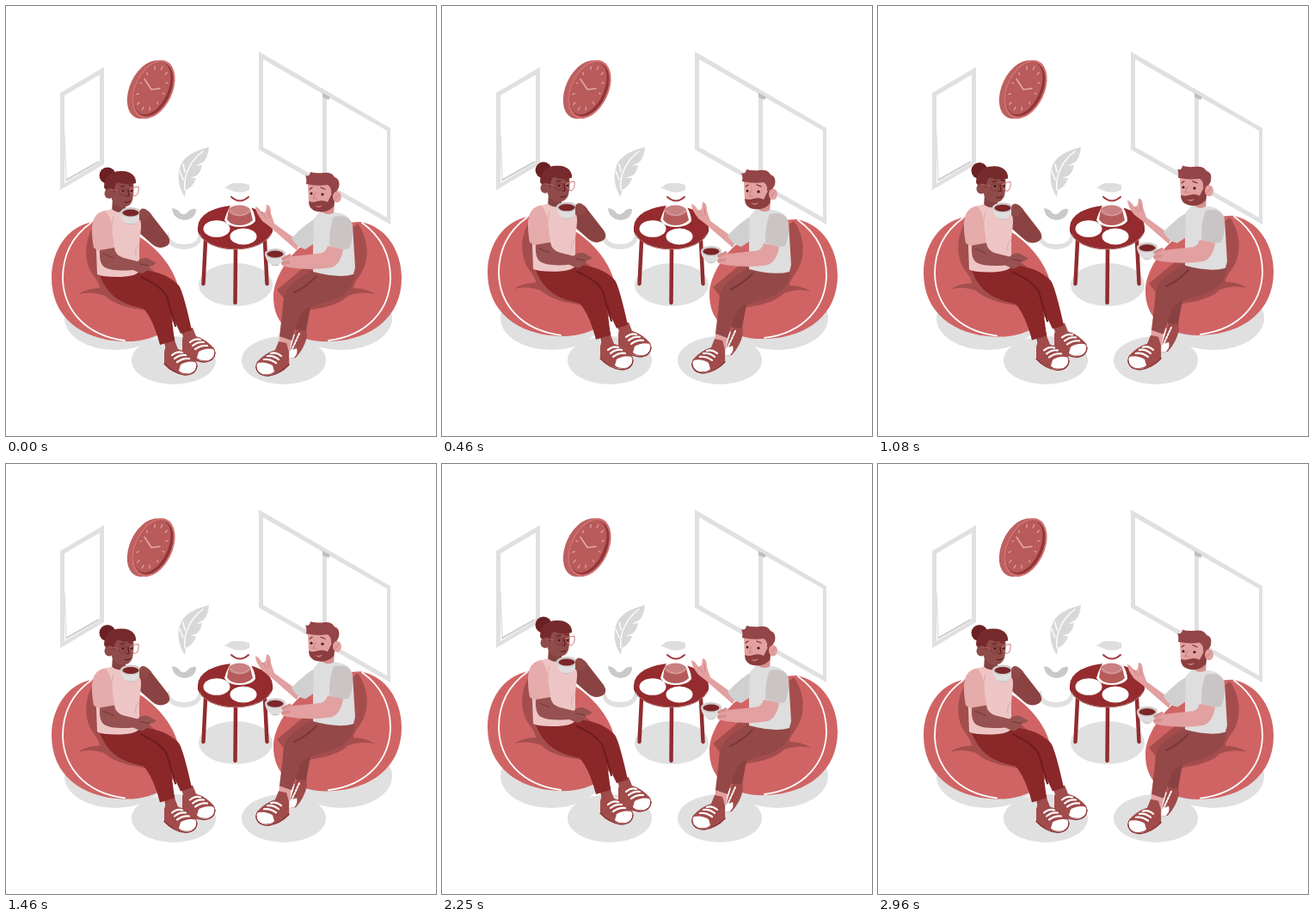
Animation, 500 px wide and 500 px high, one loop 3 s. Source, as an HTML page:

```html
<!DOCTYPE html>
<html lang="en">
<head>
<meta charset="utf-8">
<title>Coffee chat</title>
<style>
  html, body { margin: 0; height: 100%; overflow: hidden; background: #fff; }
  svg { display: block; width: 100%; height: 100%; }
  .line { fill: none; stroke-linecap: round; stroke-linejoin: round; }
</style>
</head>
<body>
<svg viewBox="0 0 500 500">
  <defs>
    <g id="bag">
      <path fill="#d06464" d="M101 251C71 256 53 285 53 316C53 362 88 388 135 390C176 392 203 372 202 337C200 300 155 252 101 251Z"/>
      <path fill="#a54d4d" d="M104 253C91 271 89 296 102 314Q109 323 109 328Q95 328 84 335Q100 331 115 337C132 352 152 351 177 357L198 330L150 290Z"/>
      <path class="line" stroke="#fff" stroke-width="1.8" d="M99 252C75 269 66 292 66 317C67 352 91 383 138 389"/>
    </g>
    <g id="shoe">
      <path fill="#a14b4b" d="M184 402L187 391L196 389L200 399Q211 402 221 413C225 421 220 428 209 428Q194 427 184 416Z"/>
      <path fill="#fff" d="M203 417Q211 412 220 414Q225 423 214 427Q205 428 201 424Z"/>
      <path class="line" stroke="#8b3033" stroke-width="1.3" d="M184 416Q194 427 208 429Q221 429 222 418"/>
      <path class="line" stroke="#fff" stroke-width="2.2" d="M193 406Q199 401 205 403M196 410Q202 405 209 406M199 414Q206 409 213 410"/>
    </g>
    <g id="cup">
      <path fill="#dedede" d="M-12 -1Q-10 8 -4 11Q0 13 4 11Q10 8 12 -1Z"/>
      <ellipse rx="12" ry="6" cy="-2" fill="#cfcaca"/>
      <ellipse rx="9.5" ry="4" cy="-1.5" fill="#7b2629"/>
      <path class="line" stroke="#c2bcbc" d="M-4 11Q0 13 4 11"/>
    </g>
  </defs>

  <!-- windows -->
  <g fill="#e0e0e0" fill-rule="evenodd">
    <path d="M63 101L114 71V184L63 214ZM68 104V206L109 182V80Z"/>
    <path d="M294 53L447 142V254L294 167ZM299 62V164L368 203V102ZM373 105V206L443 246V145Z"/>
  </g>
  <path d="M68 150L70 203L109 181" class="line" stroke="#e0e0e0" stroke-width="1.5"/>
  <path d="M70 202L107 181" class="line" stroke="#bababa"/>
  <path d="M368 101L377 106L375 109L368 106Z" fill="#bdbdbd"/>

  <!-- clock -->
  <g transform="translate(171.5 97) rotate(25)">
    <ellipse cx="-5" cy="2.5" rx="22" ry="36" fill="#bd6060"/>
    <ellipse rx="22" ry="36" fill="#cf7070"/>
    <ellipse rx="20" ry="33.5" fill="#913638"/>
    <ellipse cx="-1.8" cy="-.5" rx="18.2" ry="32.5" fill="#b95b5b"/>
    <g id="ticks" stroke="#e3a3a3" stroke-width="1.2"></g>
  </g>
  <path class="line" stroke="#e6aaaa" stroke-width="1.5" d="M161 85L169 97L179 96"/>

  <!-- plant -->
  <path fill="#d8d8d8" d="M208 222C199 209 198 191 206 180C213 171 225 167 236 164Q235 175 230 181L221 186L228 185Q227 192 222 197L214 200L221 200Q218 210 209 214Z"/>
  <path class="line" stroke="#fff" stroke-width="1.4" d="M208 214C206 196 215 179 229 169M206 202L202 192M208 193L206 184"/>
  <ellipse cx="207" cy="270" rx="20" ry="13" fill="#e0e0e0"/>
  <path fill="#fff" d="M190 236H224V266Q222 277 207 277Q192 277 190 266Z"/>
  <path fill="#c9c9c9" d="M193 235Q200 236 203 241Q207 244 211 240Q215 235 221 236Q221 248 207 249Q194 247 193 235Z"/>

  <!-- floor shadows -->
  <g fill="#e0e0e0">
    <ellipse cx="127" cy="363" rx="59" ry="37"/>
    <ellipse cx="390" cy="363" rx="59" ry="37"/>
    <ellipse cx="195" cy="412" rx="49" ry="28"/>
    <ellipse cx="323" cy="412" rx="49" ry="28"/>
    <ellipse cx="267" cy="324" rx="43" ry="25"/>
  </g>

  <!-- table and jug -->
  <path class="line" stroke="#912c2f" stroke-width="4.5" d="M232 273L229.500 323M301 273L303.500 323M267 284L266.500 345"/>
  <path fill="#7d2326" d="M223 257V262A44 25 0 0 0 310 262V257Z"/>
  <ellipse cx="266.500" cy="257" rx="43.500" ry="25" fill="#952b2e"/>
  <path class="line" stroke="#c98a8a" stroke-width=".8" d="M225 265A43 24 0 0 0 308 265"/>
  <g fill="#fff">
    <ellipse cx="245" cy="259" rx="15.500" ry="9.800"/>
    <ellipse cx="276" cy="268" rx="15.500" ry="9.500"/>
    <path d="M260 215H283L281 228Q290 240 290 250Q285 257 272 257Q258 257 254 249Q257 238 263 229Z"/>
  </g>
  <path fill="#b55b5b" d="M259 236Q272 228 284 237L287 249Q281 255 271 255Q261 255 257 248Z"/>
  <ellipse cx="271.500" cy="238" rx="12.500" ry="6.500" fill="#c98080"/>
  <path class="line" stroke="#dba9a9" d="M259 237Q271 250 284 238"/>
  <path class="line" stroke="#a33b3e" stroke-width="2" d="M262 222Q272 231 282 222"/>
  <path fill="#dedede" d="M254 211Q259 209 260 207Q272 204 283 208V214Q273 219 263 215Z"/>

  <!-- woman -->
  <g id="woman">
    <use href="#bag"/>
    <path fill="#8a4342" d="M154 247L157 237Q163 235 167 240L188 267Q193 275 187 279Q178 284 170 277L154 263Z"/>
    <path fill="#8f4745" d="M183 388L196 385L197 400L187 402ZM204 379L216 375L219 387L208 390Z"/>
    <use href="#shoe" x="21" y="-15"/>
    <use href="#shoe"/>
    <path fill="#8a2729" d="M107 308L158 307Q186 309 201 325Q206 332 216 377L203 381L192 358L196 389L179 394Q171 364 160 352C137 346 119 342 107 308Z"/>
    <path class="line" stroke="#6e1d20" stroke-width="2.200" d="M157 315Q181 326 187 338L197 372"/>
    <path fill="#834140" d="M124 224H139V237Q141 246 131 247Q124 245 123 239Z"/>
    <path fill="#eec5c5" d="M112 239L123 236Q131 243 139 237L151 243Q158 247 157 258L155 277V308Q152 315 129 315Q111 315 106 312L105 285Q103 252 112 239Z"/>
    <path class="line" stroke="#dfa9a9" d="M125 245Q120 262 125 278M155 277Q149 282 151 290"/>
    <path fill="#e6abab" d="M115 238C99 241 98 257 102 281Q111 289 126 282L123 258Q122 244 115 238Z"/>
    <path fill="#965150" d="M109 284L126 281Q127 290 137 293L153 297Q160 291 166 294L175 299Q171 302 167 303Q164 310 157 311L148 307Q124 309 115 304Q108 300 109 284Z"/>
    <path class="line" stroke="#733635" d="M113 288L125 293M156 300L166 302"/>
    <!-- head -->
    <path fill="#8f4b4a" d="M122 203L147 200Q150 212 147 226Q144 235 133 234Q123 232 122 219Z"/>
    <circle cx="118" cy="197" r="9.500" fill="#6b2023"/>
    <path fill="#762a2c" d="M114 211C114 199 122 192 133 192C146 191 152 199 151 206Q140 209 130 205Q126 207 126 217L120 219Z"/>
    <ellipse cx="120" cy="218" rx="5.500" ry="6" fill="#8f4b4a"/>
    <path class="line" stroke="#b56262" stroke-width=".9" d="M121 213L132 215"/>
    <circle cx="136" cy="216" r="4.500" class="line" stroke="#7a3434" stroke-width=".8"/>
    <path class="line" stroke="#cf7777" d="M145 213Q149 210 154 210Q155 219 150 221Q146 220 145 213Z"/>
    <path class="line" stroke="#5d1c1e" stroke-width="1.200" d="M133 210L138 209M143 208L147 209M138 228Q141 229 144 227M142 213L143 221L140 221"/>
    <g fill="#451416"><circle cx="136" cy="215" r="1.300"/><circle cx="146" cy="215" r="1.200"/></g>
    <!-- cup in hand -->
    <use href="#cup" x="145" y="242"/>
    <path fill="#8f4a48" d="M155 240Q156 234 162 236L169 242L163 250L155 249Z"/>
  </g>

  <!-- man -->
  <g id="man">
    <use href="#bag" transform="translate(513 0) scale(-1 1)"/>
    <path fill="#a14b4b" d="M337 378L349 374L350 384Q347 398 337 409L328 410Z"/>
    <path class="line" stroke="#fff" stroke-width="2" stroke-dasharray="2 2" d="M341 381L330 405"/>
    <path fill="#fff" d="M330 401L338 398Q340 404 335 409L328 410Z"/>
    <path fill="#8a4141" d="M365 316L389 324Q379 342 354 350L349 377L337 377L330 348Z"/>
    <path fill="#e2a0a0" d="M318 382L332 384L330 402L317 399Z"/>
    <use href="#shoe" transform="translate(515 1) scale(-1.010 1)"/>
    <path fill="#944848" d="M405 307C407 329 391 342 361 347Q345 352 342 360L332 389L318 384L322 350Q322 334 330 326Q344 313 361 305Z"/>
    <path class="line" stroke="#753538" stroke-width="1.800" d="M361 314Q349 327 335 333"/>
    <!-- raised arm -->
    <path fill="#e2a0a0" d="M338 284L306 256L298 250Q290 240 290 233Q294 234 298 241L302 239L303 231Q308 231 308 241L312 253L334 269L349 263Z"/>
    <path class="line" stroke="#ca7e7e" stroke-width=".8" d="M298 241L303 247M305 238L306 246"/>
    <path fill="#d0d0d0" d="M362 246Q349 252 332 270Q338 281 348 283L360 275Z"/>
    <path fill="#d68e8e" d="M366 230H382L381 243Q374 251 365 245Z"/>
    <path fill="#dedede" d="M358 247L366 238Q373 245 382 240Q400 241 403 256Q404 270 406 304L404 312Q387 317 357 309V280Z"/>
    <path fill="#cbc4c5" d="M381 245Q401 241 403 256Q404 270 399 282Q387 285 376 278Q376 256 381 245Z"/>
    <!-- cup arm -->
    <path fill="#e2a0a0" d="M374 279L392 283Q389 300 379 304Q355 308 329 304L321 302Q318 293 324 290L333 291L362 288Q372 288 374 279Z"/>
    <use href="#cup" x="313" y="290"/>
    <path class="line" stroke="#d68e8e" stroke-width="3.500" d="M322 294L330 290M322 299L329 298"/>
    <!-- head -->
    <path fill="#e2a0a0" d="M351 207H380V228Q377 238 364 238Q353 236 352 228Z"/>
    <path fill="#8c3d3e" d="M352 227Q357 229 362 227Q369 225 374 228L380 216L384 219L381 233Q374 241 362 239Q352 237 352 227Z"/>
    <path fill="#944547" d="M349 207Q350 201 348 197Q353 199 354 193Q361 195 369 194Q379 193 382 199Q389 201 387 211L382 220L378 218Q379 211 374 208Q362 210 349 207Z"/>
    <ellipse cx="385" cy="222" rx="5" ry="6.500" fill="#e2a0a0"/>
    <path class="line" stroke="#c87c7c" stroke-width=".9" d="M383 224L387 219M360 217L357 224L361 224"/>
    <path class="line" stroke="#7b3032" stroke-width="1.300" d="M353 213L356 211M366 211L371 213"/>
    <path d="M359 232Q364 234 368 231Q365 237 359 232Z" fill="#d68080"/>
    <g fill="#45181a"><circle cx="355" cy="218" r="1.500"/><circle cx="368" cy="219" r="1.600"/></g>
  </g>
</svg>
<script>
  const get = id => document.getElementById(id);
  const point = (a, k) => `${(-1.8 + 16 * k * Math.cos(a)).toFixed(2)} ${(-.5 + 28.5 * k * Math.sin(a)).toFixed(2)}`;
  let ticks = '';
  for (let i = 0; i < 12; i++) {
    const a = i * Math.PI / 6;
    ticks += `<path d="M${point(a, 1)}L${point(a, .83)}"/>`;
  }
  get('ticks').innerHTML = ticks;

  // Linear rise of 10 units and return.
  const float = (id, t, period) => {
    const phase = t % period / period;
    const y = -10 * (1 - Math.abs(2 * phase - 1));
    get(id).setAttribute('transform', `translate(0 ${y.toFixed(3)})`);
  };

  const start = performance.now();
  function frame() {
    const t = performance.now() - start;
    float('woman', t, 1500);
    float('man', t, 3000);
    requestAnimationFrame(frame);
  }
  frame();
</script>
</body>
</html>
```
